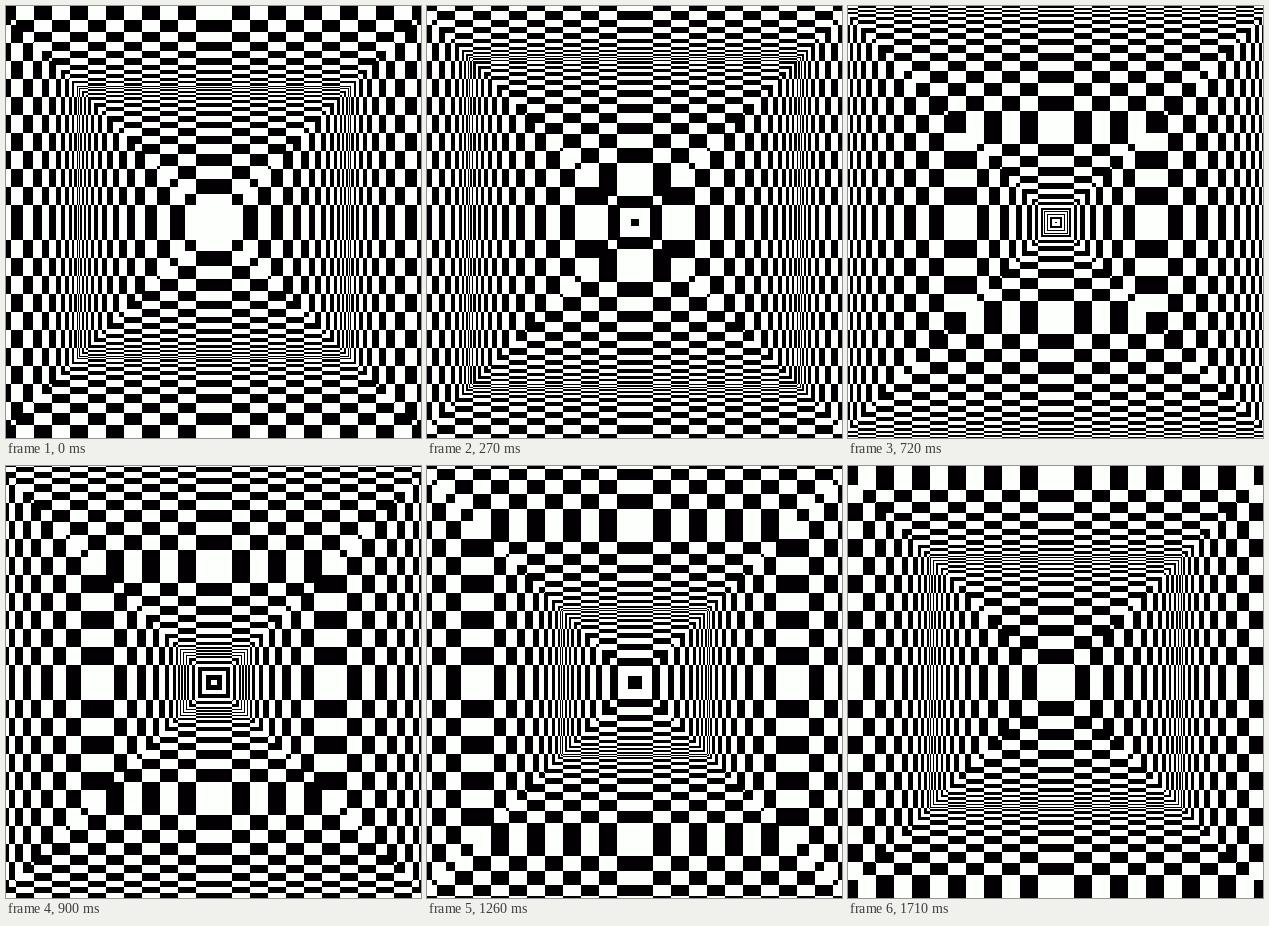
An HTML page with a canvas for the animation above (1800 ms loop, 415x432 px).

```html
<!DOCTYPE html>
<html lang="en">
<head>
<meta charset="utf-8">
<title>Checkered tunnel</title>
<style>
html, body { margin: 0; width: 100%; height: 100%; overflow: hidden; background: #fdfffd; }
canvas { display: block; width: 415px; height: 432px; image-rendering: pixelated; }
</style>
</head>
<body>
<canvas id="stage" width="415" height="432"></canvas>
<script>
const W = 415, H = 432, CX = 208, CY = 216.5;
const CELL = 18, PERIOD = W / 2, STEPS = 20, STEP_MS = 90;
const WHITE = 0xfffdfffd, BLACK = 0xff030003;
const START = -4;

const ctx = document.getElementById('stage').getContext('2d');
const image = ctx.createImageData(W, H);
const pixels = new Uint32Array(image.data.buffer);

// Edges whose spacing shrinks by a constant ratio.
function shrinking(from, width, ratio, count) {
  const list = [];
  for (let i = 0; i < count; i++) {
    list.push(from);
    from += width;
    width *= ratio;
  }
  return list;
}

// One period: a wide ring, bands narrowing to a dense fold, then widening again.
const outer = shrinking(29, 15.2, 0.868, 19);
const inner = shrinking(START + PERIOD, -12.4, 0.84, 12).reverse();
const fold = (outer[outer.length - 1] + inner[0]) / 2;
const edges = [...outer, fold, ...inner];

function bandParity(r, shift) {
  let u = (r - shift - START) % PERIOD;
  if (u < 0) u += PERIOD;
  u += START;
  let n = 0;
  while (n < edges.length && edges[n] <= u) n++;
  return n & 1;
}

function draw(step) {
  const shift = step * PERIOD / STEPS;
  const bands = Array.from({ length: H / 2 + 1 }, (_, i) => bandParity(i + 0.5, shift));
  for (let y = 0, p = 0; y < H; y++) {
    const dy = Math.floor(Math.abs(y + 0.5 - CY));
    for (let x = 0; x < W; x++, p++) {
      const dx = Math.floor(Math.abs(x + 0.5 - CX));
      const along = Math.floor(Math.min(dx, dy) / CELL);
      pixels[p] = (bands[Math.max(dx, dy)] + along) & 1 ? BLACK : WHITE;
    }
  }
  ctx.putImageData(image, 0, 0);
}

const origin = performance.now();
let shown = 0;
draw(0);

function tick() {
  const step = Math.floor((performance.now() - origin) / STEP_MS) % STEPS;
  if (step !== shown) draw(shown = step);
  requestAnimationFrame(tick);
}
requestAnimationFrame(tick);
</script>
</body>
</html>
```
